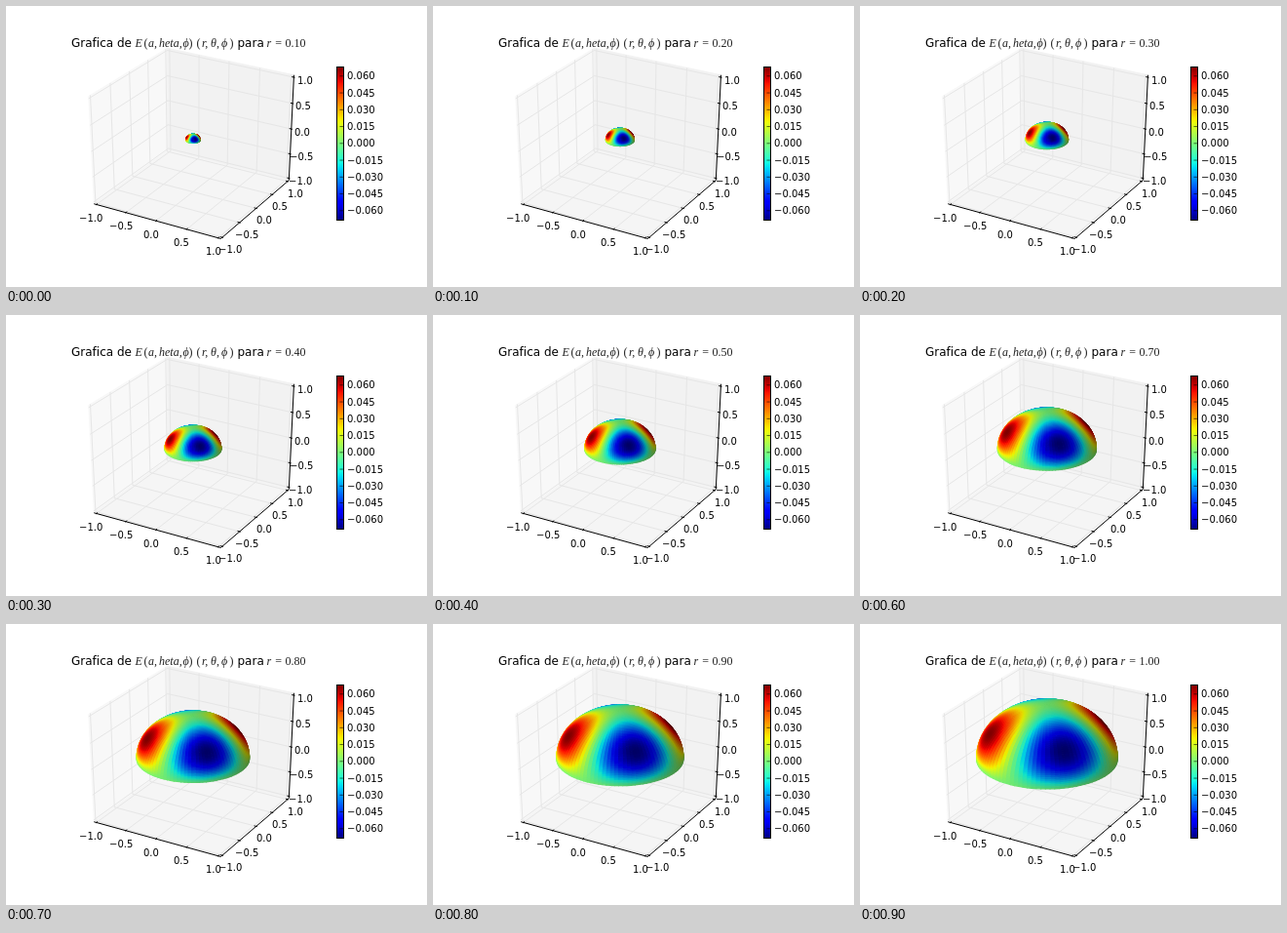
Animation of 432 by 288 pixels, one loop 1 s. Source, as an HTML page with a canvas:

```html
<!DOCTYPE html>
<html lang="es">
<head>
<meta charset="utf-8">
<title>Grafica 3D</title>
<style>
  html, body { margin: 0; width: 100%; height: 100%; overflow: hidden; background: #fff; }
  svg, canvas { position: absolute; left: 0; top: 0; width: 432px; height: 288px; }
  .sans { font-family: "DejaVu Sans", sans-serif; }
  .math { font-family: "Liberation Serif", "Noto Serif", serif; fill: #222; }
  .it { font-style: italic; }
</style>
</head>
<body>
<svg id="plot" viewBox="0 0 432 288"></svg>
<canvas id="dome"></canvas>
<script>
const W = 432, H = 288;
const svg = document.getElementById('plot');
const canvas = document.getElementById('dome');
const ctx = canvas.getContext('2d');

function add(tag, attrs, text) {
  const el = document.createElementNS('http://www.w3.org/2000/svg', tag);
  for (const key in attrs) el.setAttribute(key, attrs[key]);
  if (text !== undefined) el.textContent = text;
  svg.appendChild(el);
  return el;
}

// Perspective camera: azimuth -60, elevation 30, data range -1..1.
const S3 = Math.sqrt(3);
const depth = ([x, y, z]) => x * S3 / 4 - y * 0.75 + z / 2;
function project(p) {
  const [x, y, z] = p;
  const right = x * S3 / 2 + y / 2;
  const up = -x / 4 + y * S3 / 4 + z * S3 / 2;
  const w = 20 - depth(p);
  return [191.9 + 1442 * right / w, 137.4 - 1208 * up / w];
}

function lerpStops(stops, v) {
  for (let i = 1; i < stops.length; i++) {
    const [a, fa] = stops[i - 1], [b, fb] = stops[i];
    if (v <= b) return fa + (fb - fa) * (v - a) / (b - a);
  }
  return stops[stops.length - 1][1];
}
const RED = [[0, 0], [0.35, 0], [0.66, 1], [0.89, 1], [1, 0.5]];
const GREEN = [[0, 0], [0.125, 0], [0.375, 1], [0.64, 1], [0.91, 0], [1, 0]];
const BLUE = [[0, 0.5], [0.11, 1], [0.34, 1], [0.65, 0], [1, 0]];
const jet = (v, light = 1) =>
  'rgb(' + [RED, GREEN, BLUE].map(s => Math.round(255 * light * lerpStops(s, v))) + ')';

const points = list => list.map(p => project(p).map(n => n.toFixed(2)).join()).join(' ');
const line = (list, stroke) => add('polyline', { points: points(list), fill: 'none', stroke });
const pane = (list, fill) => add('polygon', { points: points(list), fill, stroke: fill });
const fixed = (v, n) => (v < 0 ? '\u2212' : '') + Math.abs(v).toFixed(n);
const label = (x, y, text) => add('text',
  { x: Math.round(x), y: Math.round(y + 3.6), class: 'sans', 'font-size': 10 }, text);

function drawAxes() {
  const B = 1 + 1 / 24;
  const A = -B;
  pane([[A, A, A], [A, B, A], [A, B, B], [A, A, B]], '#f8f8f8');
  pane([[A, B, A], [B, B, A], [B, B, B], [A, B, B]], '#f2f2f2');
  pane([[A, A, A], [B, A, A], [B, B, A], [A, B, A]], '#f5f5f5');

  const ticks = [-1, -0.5, 0, 0.5, 1];
  for (const t of ticks) {
    line([[t, A, A], [t, B, A], [t, B, B]], '#e6e6e6');
    line([[B, t, A], [A, t, A], [A, t, B]], '#e6e6e6');
    line([[B, B, t], [A, B, t], [A, A, t]], '#e6e6e6');
  }
  line([[A, A, A], [B, A, A], [B, B, A], [B, B, B]], '#000');

  const out = B + 0.0167, inner = B - 0.033;
  const mark = (a, b, at, dx, dy, t) => {
    line([a, b], '#000');
    const [x, y] = project(at);
    const halfWidth = t < 0 ? 12.1 : 7.9;
    label(x + dx - halfWidth, y + dy, fixed(t, 1));
  };
  for (const t of ticks) {
    mark([t, -out, A], [t, -inner, A], [t, A, A], -5.2, 13.7, t);
    mark([out, t, A], [inner, t, A], [B, t, A], 7.7, 12.2, t);
    mark([out, B, t], [inner, B, t], [B, B, t], 11.3, 3, t);
  }
}

function drawColorbar() {
  const top = 62.5, height = 157, x = 339.5, width = 7;
  const grad = add('linearGradient', { id: 'jet', x1: 0, y1: 0, x2: 0, y2: 1 });
  for (let i = 0; i <= 64; i++) {
    const stop = add('stop', { offset: i / 64, 'stop-color': jet(1 - i / 64) });
    grad.appendChild(stop);
  }
  add('rect', { x, y: top, width, height, fill: 'url(#jet)', stroke: '#000' });
  for (let i = -4; i <= 4; i++) {
    const y = 140.8 - i * 17.25;
    add('path', { d: `M${x + width} ${y}h-4`, stroke: '#000', 'stroke-width': 0.6 });
    label(350, y, fixed(i * 0.015, 3));
  }
}

function drawTitle() {
  const put = (x, text, cls) => add('text', { x, y: 42, class: cls, 'font-size': 12 }, text);
  put(67, 'Grafica de', 'sans');
  put(237.5, 'para', 'sans');
  const italic = [[132.5, 'E'], [146, 'a,'], [157, 'heta,'], [181.5, 'ϕ'],
    [201, 'r,'], [210, 'θ,'], [221, 'ϕ'], [267.5, 'r']];
  const upright = [[141.5, '('], [187.5, ')'], [195.5, '('], [229.5, ')'], [276.3, '=']];
  italic.forEach(([x, s]) => put(x, s, 'math it'));
  upright.forEach(([x, s]) => put(x, s, 'math'));
  return put(286.5, '', 'math');
}

// Unit hemisphere split into patches, sorted back to front.
function buildDome(rows, cols) {
  const at = (i, j) => {
    const th = i / rows * Math.PI / 2, ph = j / cols * 2 * Math.PI;
    return [Math.sin(th) * Math.cos(ph), Math.sin(th) * Math.sin(ph), Math.cos(th)];
  };
  const peak = 2 / (3 * S3);
  // Light from (-1, -1, 0.5), scaled to 0.5..1 over the whole dome.
  const shade = ([x, y, z]) => 0.5 + 0.5 * (z / 2 - x - y + Math.SQRT2) / (1.5 + Math.SQRT2);
  const patches = [];
  for (let i = 0; i < rows; i++) {
    for (let j = 0; j < cols; j++) {
      const mid = at(i + 0.5, j + 0.5);
      // sin²θ cosθ sin2φ
      const value = 2 * mid[0] * mid[1] * mid[2] / peak;
      patches.push({
        corners: [at(i, j), at(i + 1, j), at(i + 1, j + 1), at(i, j + 1)],
        color: jet((value + 1) / 2, shade(mid)),
        depth: depth(mid)
      });
    }
  }
  return patches.sort((a, b) => a.depth - b.depth);
}

function drawDome(r) {
  ctx.clearRect(0, 0, W, H);
  for (const { corners, color } of dome) {
    ctx.beginPath();
    for (const c of corners) ctx.lineTo(...project(c.map(n => n * r)));
    ctx.closePath();
    ctx.fillStyle = ctx.strokeStyle = color;
    ctx.fill();
    ctx.stroke();
  }
}

const ratio = window.devicePixelRatio || 1;
canvas.width = W * ratio;
canvas.height = H * ratio;
ctx.scale(ratio, ratio);
ctx.lineWidth = 1.3;
ctx.lineJoin = 'round';

drawAxes();
drawColorbar();
const radiusText = drawTitle();
const dome = buildDome(50, 100);

const start = performance.now();
let shown = -1;
function update() {
  const step = Math.floor((performance.now() - start) % 1000 / 100);
  if (step !== shown) {
    shown = step;
    const r = (step + 1) / 10;
    radiusText.textContent = r.toFixed(2);
    drawDome(r);
  }
  requestAnimationFrame(update);
}
update();
</script>
</body>
</html>
```
